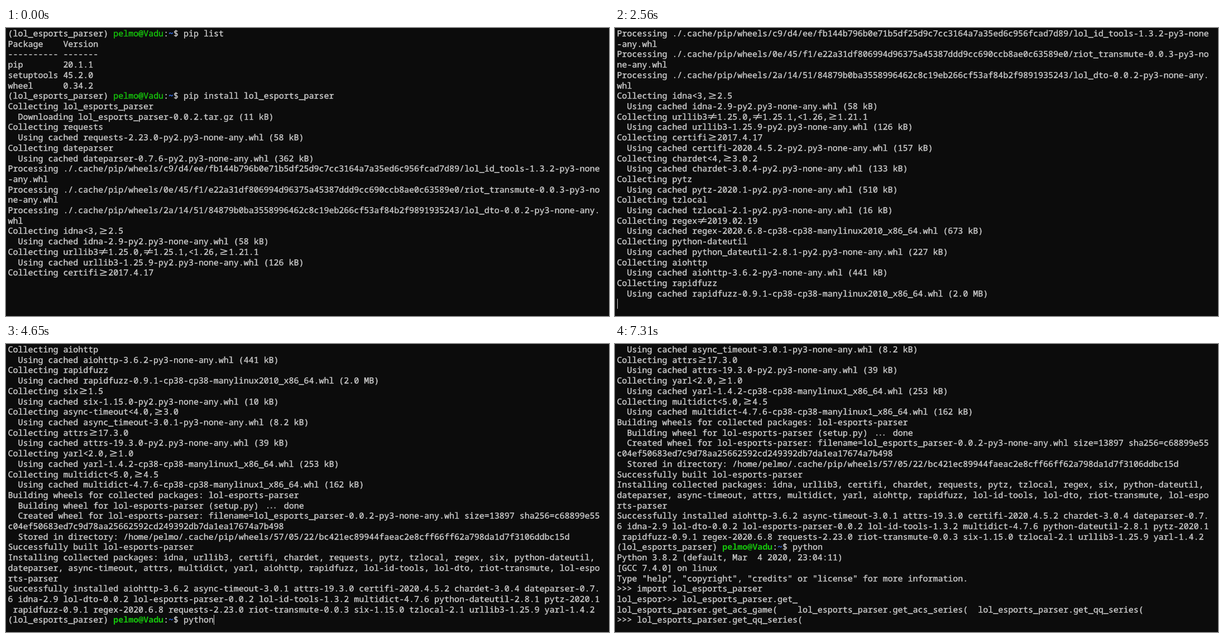
Write an HTML page with a canvas that moves like this. It is 1080x518 px and loops after 8 s.

```html
<!DOCTYPE html>
<html lang="en">
<head>
<meta charset="utf-8">
<title>Installing a package</title>
<style>
  html, body { margin: 0; width: 100%; height: 100%; overflow: hidden; background: #0c0c0c; }
  canvas { display: block; }
</style>
</head>
<body>
<canvas id="terminal" width="1080" height="518"></canvas>
<script>
const LOOP = 8000, COLS = 118, ROWS = 27;
const CELL = 8.985, PITCH = 18.71, LEFT = 3.6, BASE = 15;
const GREY = '#cccccc', GREEN = '#16c60c', BLUE = '#3b78ff';
const ctx = document.getElementById('terminal').getContext('2d');

const USER = 'pelmo@Vadu';
const PROMPT = `(lol_esports_parser) ${USER}:~$ `;
const BUILDING = '  Building wheel for lol-esports-parser (setup.py) ... ';
const CACHE = 'Processing ./.cache/pip/wheels/';
const wheel = (spec, file, size) =>
  [`Collecting ${spec}`, `  Using cached ${file}-none-any.whl (${size})`];
const binary = (spec, file, linux, size) =>
  [`Collecting ${spec}`, `  Using cached ${file}-cp38-cp38-many${linux}_x86_64.whl (${size})`];

const output = [
  PROMPT + 'pip list',
  'Package    Version',
  '---------- -------',
  'pip        20.1.1',
  'setuptools 45.2.0',
  'wheel      0.34.2',
  PROMPT + 'pip install lol_esports_parser',
  'Collecting lol_esports_parser',
  '  Downloading lol_esports_parser-0.0.2.tar.gz (11 kB)',
  wheel('requests', 'requests-2.23.0-py2.py3', '58 kB'),
  wheel('dateparser', 'dateparser-0.7.6-py2.py3', '362 kB'),
  CACHE + 'c9/d4/ee/fb144b796b0e71b5df25d9c7cc3164a7a35ed6c956fcad7d89/lol_id_tools-1.3.2-py3-none-any.whl',
  CACHE + '0e/45/f1/e22a31df806994d96375a45387ddd9cc690ccb8ae0c63589e0/riot_transmute-0.0.3-py3-none-any.whl',
  CACHE + '2a/14/51/84879b0ba3558996462c8c19eb266cf53af84b2f9891935243/lol_dto-0.0.2-py3-none-any.whl',
  wheel('idna<3,>=2.5', 'idna-2.9-py2.py3', '58 kB'),
  wheel('urllib3!=1.25.0,!=1.25.1,<1.26,>=1.21.1', 'urllib3-1.25.9-py2.py3', '126 kB'),
  wheel('certifi>=2017.4.17', 'certifi-2020.4.5.2-py2.py3', '157 kB'),
  wheel('chardet<4,>=3.0.2', 'chardet-3.0.4-py2.py3', '133 kB'),
  wheel('pytz', 'pytz-2020.1-py2.py3', '510 kB'),
  wheel('tzlocal', 'tzlocal-2.1-py2.py3', '16 kB'),
  binary('regex!=2019.02.19', 'regex-2020.6.8', 'linux2010', '673 kB'),
  wheel('python-dateutil', 'python_dateutil-2.8.1-py2.py3', '227 kB'),
  wheel('aiohttp', 'aiohttp-3.6.2-py3', '441 kB'),
  binary('rapidfuzz', 'rapidfuzz-0.9.1', 'linux2010', '2.0 MB'),
  wheel('six>=1.5', 'six-1.15.0-py2.py3', '10 kB'),
  wheel('async-timeout<4.0,>=3.0', 'async_timeout-3.0.1-py3', '8.2 kB'),
  wheel('attrs>=17.3.0', 'attrs-19.3.0-py2.py3', '39 kB'),
  binary('yarl<2.0,>=1.0', 'yarl-1.4.2', 'linux1', '253 kB'),
  binary('multidict<5.0,>=4.5', 'multidict-4.7.6', 'linux1', '162 kB'),
  'Building wheels for collected packages: lol-esports-parser',
  BUILDING + 'done',
  '  Created wheel for lol-esports-parser: filename=lol_esports_parser-0.0.2-py3-none-any.whl size=13897 ' +
    'sha256=c68899e55c04ef50683ed7c9d78aa25662592cd249392db7da1ea17674a7b498',
  '  Stored in directory: /home/pelmo/.cache/pip/wheels/57/05/22/bc421ec89944faeac2e8cff66ff62a798da1d7f3106ddbc15d',
  'Successfully built lol-esports-parser',
  'Installing collected packages: idna, urllib3, certifi, chardet, requests, pytz, tzlocal, regex, six, ' +
    'python-dateutil, dateparser, async-timeout, attrs, multidict, yarl, aiohttp, rapidfuzz, lol-id-tools, ' +
    'lol-dto, riot-transmute, lol-esports-parser',
  'Successfully installed aiohttp-3.6.2 async-timeout-3.0.1 attrs-19.3.0 certifi-2020.4.5.2 chardet-3.0.4 ' +
    'dateparser-0.7.6 idna-2.9 lol-dto-0.0.2 lol-esports-parser-0.0.2 lol-id-tools-1.3.2 multidict-4.7.6 ' +
    'python-dateutil-2.8.1 pytz-2020.1 rapidfuzz-0.9.1 regex-2020.6.8 requests-2.23.0 riot-transmute-0.0.3 ' +
    'six-1.15.0 tzlocal-2.1 urllib3-1.25.9 yarl-1.4.2',
  PROMPT + 'python',
  'Python 3.8.2 (default, Mar  4 2020, 23:04:11)',
  '[GCC 7.4.0] on linux',
  'Type "help", "copyright", "credits" or "license" for more information.',
  '>>> import lol_esports_parser',
  'lol_espor>>> lol_esports_parser.get_',
  'lol_esports_parser.get_acs_game(    lol_esports_parser.get_acs_series(  lol_esports_parser.get_qq_series(',
  '>>> lol_esports_parser.get_qq_series('
];
const lines = output.flat().flatMap(text => text.match(new RegExp(`.{1,${COLS}}`, 'g')));

// Each step: start time, index of the bottom line, its text if unfinished, cursor shown
const steps = [
  [0, 23], [1000, 27, ''], [1150, 29], [1560, 31], [1930, 33], [2030, 35], [2320, 37],
  [2560, 39, '', true], [2630, 41], [2710, 45], [2890, 47],
  [3110, 50, BUILDING + '-'], [3180, 50, BUILDING + '\\'],
  [3570, 55, ''], [3650, 58, '', true], [4650, 61, undefined, true],
  [5150, 62, '', true], [5310, 65, undefined, true], [6810, 66, undefined, true], [7310, 68]
];

function strokes(x, y, ...paths) {
  ctx.lineWidth = 1.5;
  ctx.beginPath();
  for (const path of paths)
    path.forEach(([dx, dy], i) => ctx[i ? 'lineTo' : 'moveTo'](x + dx, y + dy));
  ctx.stroke();
}

// Programming ligatures keep the cell width of the characters they join
const ligatures = {
  '>=': (x, y) => strokes(x, y, [[3, -10.3], [14.8, -6.6], [3, -2.9]], [[3, -0.7], [14.8, -0.7]]),
  '!=': (x, y) => strokes(x, y, [[1.2, -7.3], [16.8, -7.3]], [[1.2, -3.6], [16.8, -3.6]], [[5.8, 0.3], [12.2, -11.2]]),
  '...': (x, y) => [7.2, 13.5, 19.8].forEach(dx => ctx.fillRect(x + dx - 1, y - 2, 2, 2))
};

// A hairline outline gives regular text the sturdier stems of a terminal face
function drawText(text, x, y, bold) {
  ctx.font = `${bold ? 'bold ' : ''}${CELL / 0.6}px "Noto Sans Mono", monospace`;
  ctx.fillText(text, x, y);
  if (bold) return;
  ctx.lineWidth = 0.4;
  ctx.strokeText(text, x, y);
}

function drawLine(text, row, bold) {
  const y = BASE + row * PITCH;
  let col = 0;
  for (const part of text.split(/(>=|!=|\.\.\.|pelmo@Vadu|~)/)) {
    const x = LEFT + col * CELL;
    const isUser = part === USER;
    ctx.fillStyle = ctx.strokeStyle = isUser ? GREEN : part === '~' ? BLUE : GREY;
    if (ligatures[part]) ligatures[part](x, y);
    else drawText(part, x, y, bold && (isUser || part === '~'));
    col += part.length;
  }
}

function draw(time) {
  const [, last, tail = lines[last], cursor] = steps.findLast(step => step[0] <= time);
  const top = Math.max(0, last - ROWS + 1);
  ctx.fillStyle = '#0c0c0c';
  ctx.fillRect(0, 0, 1080, 518);
  ctx.lineJoin = 'round';
  ctx.textRendering = 'geometricPrecision';
  for (let i = top; i <= last; i++)
    drawLine(i === last ? tail : lines[i], i - top, i > 60);
  if (cursor) {
    ctx.fillStyle = GREY;
    ctx.fillRect(Math.round(LEFT + tail.length * CELL), Math.round((last - top) * PITCH + 0.6), 1, 18);
  }
}

function tick() {
  draw(performance.now() % LOOP);
  requestAnimationFrame(tick);
}
tick();
</script>
</body>
</html>
```
